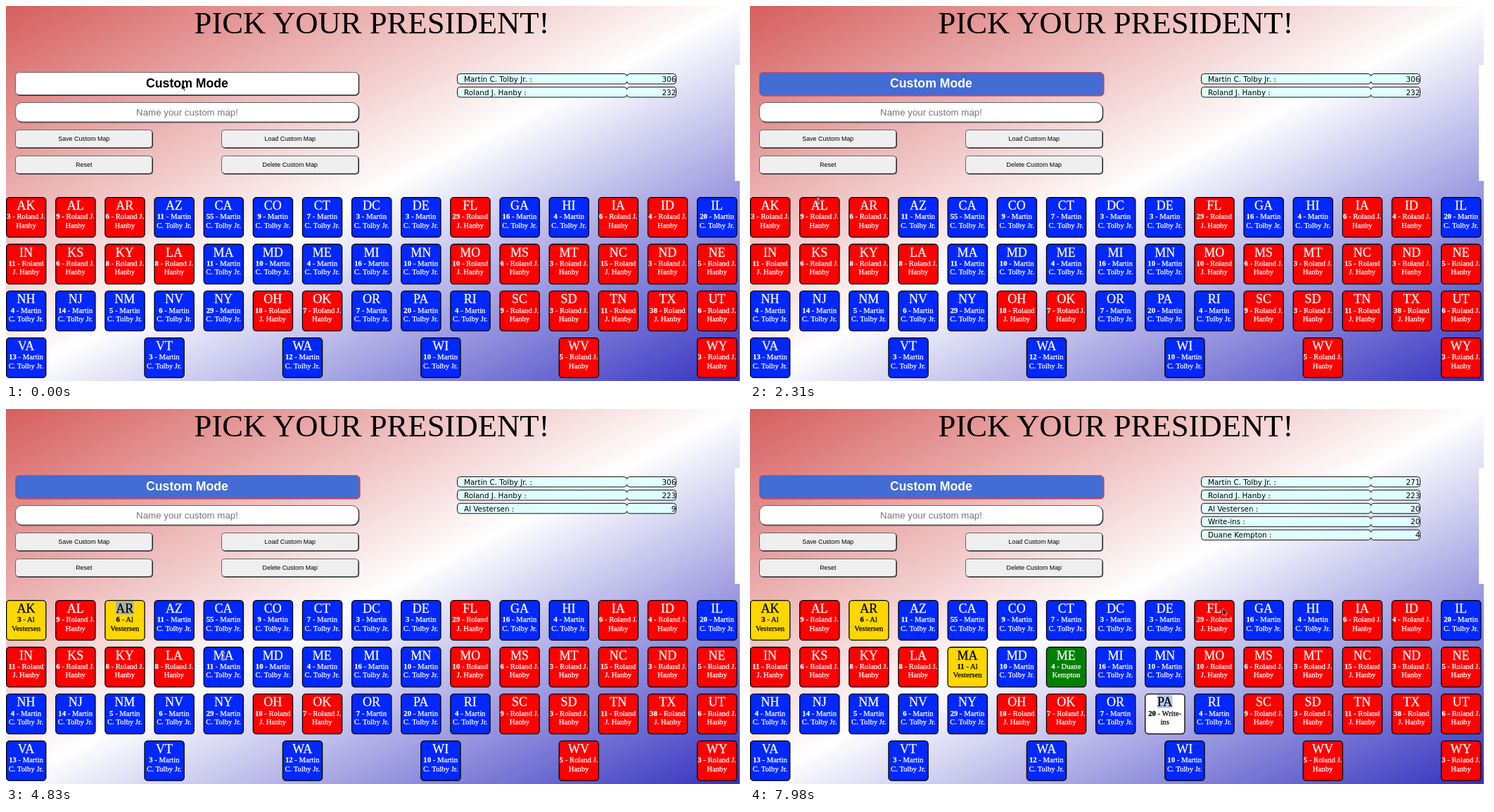
Animation of 1049x534 px, one loop 8000 ms. Source, as an HTML page:

```html
<!DOCTYPE html>
<html lang="en">
<head>
<meta charset="utf-8">
<title>Pick your president</title>
<style>
html, body { margin: 0; width: 100%; height: 100%; overflow: hidden; }
body { background: linear-gradient(to bottom right, #d65e5e, #fff 50%, #3330c0) 0 0 / 1043px 534px no-repeat #fff; }
svg { display: block; width: 1049px; height: 534px; }
text { text-anchor: middle; }
.title { font: 44.7px "Liberation Serif", Times, serif; }
.ui { font-family: "Liberation Sans", Arial, sans-serif; }
.small { font-size: 8.9px; }
.name { font-size: 13.3px; fill: #757575; }
.mode { font-size: 17.7px; font-weight: bold; }
.tile { font: 10.7px "Liberation Serif", Times, serif; }
.tile text { stroke: currentColor; stroke-width: .25px; fill: currentColor; }
.code { font-size: 18px; }
.num { font-weight: bold; }
.score { font: 10.4px "DejaVu Sans", sans-serif; }
</style>
</head>
<body>
<svg id="stage" viewBox="0 0 1049 534"></svg>
<script>
const LOOP = 8000;
const NS = 'http://www.w3.org/2000/svg';
const stage = document.getElementById('stage');

function add(parent, tag, attrs, text) {
  const node = document.createElementNS(NS, tag);
  for (const key in attrs) node.setAttribute(key, attrs[key]);
  if (text !== undefined) node.textContent = text;
  parent.appendChild(node);
  return node;
}

function set(node, attrs) {
  for (const key in attrs) node.setAttribute(key, attrs[key]);
}

function box(parent, x, y, w, h, r, fill, stroke) {
  return add(parent, 'rect', {
    x, y, width: w, height: h, rx: r, fill, stroke, 'stroke-width': stroke === 'none' ? 0 : 1
  });
}

// A box with a darker right and bottom edge.
function raised(x, y, w, h, r, fill) {
  const shade = box(stage, x + .8, y + .8, w, h, r, '#222', '#222');
  return { shade, face: box(stage, x, y, w, h, r, fill, '#666') };
}

// Clicking a tile steps through the candidates in this order.
const people = [
  { full: 'Martin C. Tolby Jr.', lines: ['Martin', 'C. Tolby Jr.'], fill: '#0028ff', ink: '#fff', mark: '#8fa6d8' },
  { full: 'Roland J. Hanby', lines: ['Roland', 'J. Hanby'], fill: '#ff0000', ink: '#fff', mark: '#c9a3a8' },
  { full: 'Al Vestersen', lines: ['Al', 'Vestersen'], fill: '#ffd700', ink: '#000', mark: '#a8b1a4' },
  { full: 'Duane Kempton', lines: ['Duane', 'Kempton'], fill: '#008000', ink: '#fff', mark: '#a9b5ab' },
  { full: 'Write-ins', lines: ['Write-', 'ins'], fill: '#fff', ink: '#000', mark: '#b4c7f0' }
];
people[1].wide = ['Roland J.', 'Hanby'];
const rank = [0, 1, 2, 4, 3];

const rows = [
  'AK3r AL9r AR6r AZ11b CA55b CO9b CT7b DC3b DE3b FL29r GA16b HI4b IA6r ID4r IL20b',
  'IN11r KS6r KY8r LA8r MA11b MD10b ME4b MI16b MN10b MO10r MS6r MT3r NC15r ND3r NE5r',
  'NH4b NJ14b NM5b NV6b NY29b OH18r OK7r OR7b PA20b RI4b SC9r SD3r TN11r TX38r UT6r',
  'VA13b VT3b WA12b WI10b WV5r WY3r'
];

const MODE_ON = 900;
const clicks = [
  [3100, 'AK'], [4260, 'AR'], [4950, 'MA'], [5150, 'MA'],
  [5860, 'ME'], [6030, 'ME'], [6200, 'ME'],
  [6960, 'PA'], [7120, 'PA'], [7290, 'PA'], [7460, 'PA']
];

// time, x, y, text cursor from here on
const path = [
  [0, 249.5, 110, 0], [900, 250, 110, 0], [1260, 252, 111, 0], [1450, 252, 111, 0],
  [2250, 100, 266, 1], [2310, 97, 276, 1], [2750, 29, 285, 1], [3500, 29, 285, 1],
  [4050, 171, 287, 1], [4400, 171, 287, 0], [4800, 309, 352, 1], [5250, 309, 352, 0],
  [5520, 371, 352, 0], [5760, 449, 352, 1], [6350, 449, 352, 0],
  [6720, 596, 398, 0], [6860, 590, 417, 1], [7550, 590, 417, 0],
  [7900, 672, 284, 0], [8000, 672, 284, 0]
];

// Page furniture
add(stage, 'text', { class: 'title', x: 520, y: 39 }, 'PICK YOUR PRESIDENT!');
box(stage, 1036, 84, 13, 165, 0, '#fff', 'none');

const mode = raised(13.5, 94.5, 487.5, 32, 5, '#fff');
const modeText = add(stage, 'text', { class: 'ui mode', x: 257.5, y: 116 }, 'Custom Mode');

raised(13.5, 137.5, 487.5, 27.5, 9, '#fff');
add(stage, 'text', { class: 'ui name', x: 257.5, y: 155.5 }, 'Name your custom map!');

function button(x, y, label) {
  raised(x + .5, y, 194.2, 25, 4, '#efefef');
  add(stage, 'text', { class: 'ui small', x: x + 97.8, y: y + 15.5 }, label);
}
button(13, 176.5, 'Save Custom Map');
button(306, 176.5, 'Load Custom Map');
button(13, 213.5, 'Reset');
button(306, 213.5, 'Delete Custom Map');

// Score table
const scores = people.map((_, i) => {
  const g = add(stage, 'g', { class: 'score', transform: `translate(0 ${96 + 18.9 * i})` });
  box(g, 641.5, .5, 241, 14.5, 4, '#e0ffff', '#111');
  box(g, 882.5, .5, 70, 14.5, 4, '#e0ffff', '#111');
  add(g, 'path', { d: 'M882.5 4V11.5', stroke: '#e0ffff', 'stroke-width': 2 });
  const label = add(g, 'text', { x: 651, y: 11.8, style: 'text-anchor:start' });
  const value = add(g, 'text', { x: 952.3, y: 11.8, style: 'text-anchor:end' });
  return { g, label, value };
});

// State tiles
const tiles = [];
rows.forEach((row, r) => {
  const items = row.split(' ');
  items.forEach((item, c) => {
    const [, code, votes, side] = item.match(/^(\D\D)(\d+)(.)$/);
    const x = c * 982 / (items.length - 1);
    const g = add(stage, 'g', { class: 'tile', transform: `translate(${x} ${272 + r * 66.67})` });
    const rect = box(g, .6, .6, 56.2, 56.6, 4.5, '#fff', '#000');
    rect.setAttribute('stroke-width', 1.3);
    const mark = box(g, 0, 2, 0, 18.5, 0, '#aaa', 'none');
    const head = add(g, 'text', { class: 'code', x: 28.5, y: 18 }, code);
    const w = head.getComputedTextLength();
    set(mark, { x: 28.5 - w / 2, width: w });
    const line1 = add(g, 'text', { x: 28.5, y: 31.3 });
    add(line1, 'tspan', { class: 'num' }, votes);
    const first = add(line1, 'tspan', {});
    const second = add(g, 'text', { x: 28.5, y: 43.8 });
    tiles.push({ code, votes: +votes, start: side === 'r' ? 1 : 0, g, rect, mark, first, second });
  });
});

// Pointer
const pointer = add(stage, 'g', {});
const arrow = add(pointer, 'path', {
  d: 'M0 0V9.5L2.2 7.5L3.7 11L5.2 10.3L3.7 7H6.6Z',
  fill: '#000', stroke: '#fff', 'stroke-width': .6
});
const beam = add(pointer, 'g', { fill: 'none' });
for (const [stroke, width] of [['#fff', 2.2], ['#222', .9]]) {
  add(beam, 'path', { d: 'M-2 -5Q0 -5 0 -3.5Q0 -5 2 -5M0 -4V4M-2 5Q0 5 0 3.5Q0 5 2 5M-1.3 1.5H1.3', stroke, 'stroke-width': width });
}

function pointerAt(t) {
  let i = 0;
  while (i < path.length - 2 && path[i + 1][0] <= t) i++;
  const a = path[i], b = path[i + 1];
  const k = (t - a[0]) / (b[0] - a[0]);
  const e = k * k * (3 - 2 * k);
  return { x: a[1] + (b[1] - a[1]) * e, y: a[2] + (b[2] - a[2]) * e, text: a[3] };
}

function drawTile(tile, done, selected) {
  const hits = done.filter(c => c[1] === tile.code).length;
  const who = (tile.start + hits) % people.length;
  const p = people[who];
  const [a, b] = p.wide && tile.votes < 10 ? p.wide : p.lines;
  tile.g.setAttribute('color', p.ink);
  tile.rect.setAttribute('fill', p.fill);
  set(tile.mark, { fill: p.mark, visibility: tile.code === selected ? 'visible' : 'hidden' });
  tile.first.textContent = ' - ' + a;
  tile.second.textContent = b;
  return who;
}

function drawTiles(done) {
  const selected = done.length ? done[done.length - 1][1] : '';
  const totals = people.map(() => 0);
  for (const tile of tiles) totals[drawTile(tile, done, selected)] += tile.votes;

  const order = rank.filter(i => totals[i]).sort((a, b) => totals[b] - totals[a]);
  scores.forEach((row, i) => {
    const who = order[i];
    row.g.setAttribute('visibility', who === undefined ? 'hidden' : 'visible');
    if (who === undefined) return;
    row.label.textContent = people[who].full + ' :';
    row.value.textContent = totals[who];
  });
}

let shown = -1;
function render(t) {
  const done = clicks.filter(c => c[0] <= t);
  if (done.length !== shown) {
    drawTiles(done);
    shown = done.length;
  }

  const on = t >= MODE_ON;
  const size = { width: on ? 488.7 : 487.5, height: on ? 32.7 : 32 };
  set(mode.face, { ...size, fill: on ? '#436cd4' : '#fff', stroke: on ? '#d8485c' : '#666' });
  set(mode.shade, { ...size, fill: on ? '#b03a55' : '#222', stroke: on ? '#b03a55' : '#222' });
  modeText.setAttribute('fill', on ? '#fff' : '#000');

  const p = pointerAt(t);
  pointer.setAttribute('transform', `translate(${p.x} ${p.y})`);
  arrow.setAttribute('visibility', p.text ? 'hidden' : 'visible');
  beam.setAttribute('visibility', p.text ? 'visible' : 'hidden');
}

const begin = performance.now();
function tick() {
  render((performance.now() - begin) % LOOP);
  requestAnimationFrame(tick);
}
tick();
</script>
</body>
</html>
```
